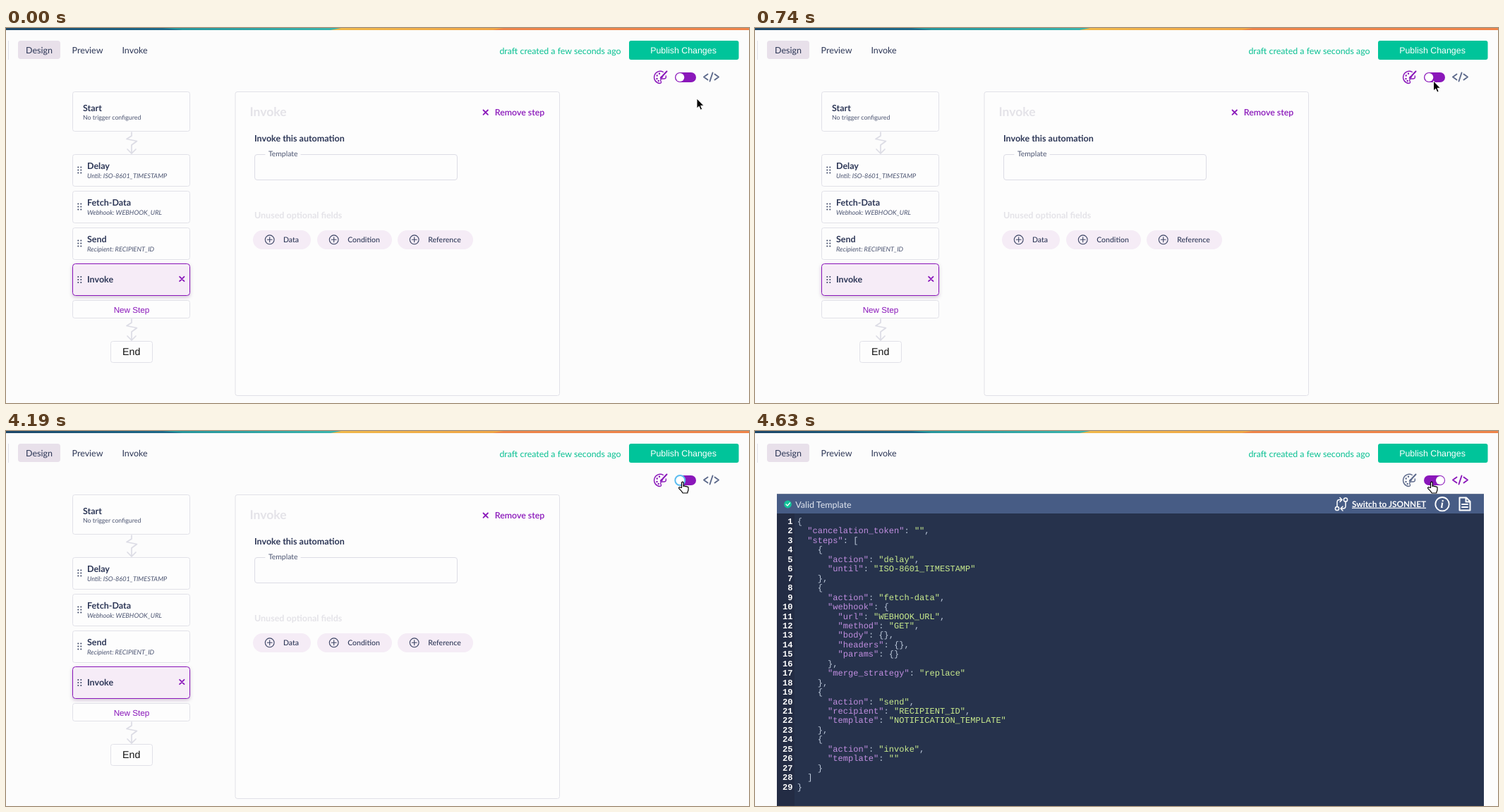
An HTML page for the animation above (8 s loop, 1053 px wide and 532 px high).

```html
<!DOCTYPE html>
<html lang="en">
<head>
<meta charset="utf-8">
<title>Automation designer</title>
<style>
  html, body { margin: 0; width: 100%; height: 100%; overflow: hidden; background: #fcfcfc; }
  svg { display: block; width: 100%; height: 100%; font: 12.5px Lato, sans-serif; fill: #2d3757; text-rendering: geometricPrecision; }
  .bold { font-weight: 700; }
  .small { font-size: 8.8px; fill: #4a5370; }
  .it { font-size: 9.2px; font-style: italic; }
  .mid { text-anchor: middle; }
  .arial { font-family: "Liberation Sans", Arial, sans-serif; }
  .purple { fill: #8a17ba; }
  .faint { fill: #e4e3e8; }
  .line { fill: none; stroke-linecap: round; stroke-linejoin: round; }
  .box { fill: #fdfdfd; stroke: #e1e1e8; }
  .pill { fill: #f5ecf6; }
  .code { font: 12.04px "Liberation Mono", "Courier New", monospace; fill: #bcc8da; }
  .key { fill: #c18ee0; }
  .str { fill: #c9eb8d; }
  .num { fill: #fff; font-weight: 700; text-anchor: end; }
</style>
</head>
<body>
<svg viewBox="0 0 1053 532">
  <defs>
    <filter id="shadow" x="-10%" y="-20%" width="120%" height="150%">
      <feDropShadow dx="0" dy="2" stdDeviation="2.5" flood-color="#50285f" flood-opacity=".25"/>
    </filter>
    <linearGradient id="navy"><stop stop-color="#1c4668"/><stop offset="1" stop-color="#1d6d8d"/></linearGradient>
    <linearGradient id="teal"><stop stop-color="#239099"/><stop offset="1" stop-color="#3bb5ad"/></linearGradient>
    <linearGradient id="gold"><stop stop-color="#f0b94a"/><stop offset="1" stop-color="#f0a445"/></linearGradient>
    <path id="zigzag" class="line" stroke="#dcdce5" stroke-width="1.7"
      d="M178 148v5l-7 4.5 14.5 3-7.5 5.5v12M172 172l6 6 6-6"/>
    <path id="cross" class="line" stroke="#8a17ba" stroke-width="1.8" d="M-3.2-3.2 3.2 3.2M3.2-3.2-3.2 3.2"/>
    <g id="plus" class="line" stroke="#3b4564" stroke-width="1.1">
      <circle r="6.4"/><path d="M-3.4 0h6.8M0-3.4v6.8"/>
    </g>
    <path id="grip" class="line" stroke="#3b4564" stroke-width="2" d="M102.3 197.5v0m0 4v0m0 4v0m4-8v0m0 4v0m0 4v0"/>
  </defs>

  <!-- Header -->
  <rect width="1053" height="532" fill="#fcfcfc"/>
  <path fill="#ee8449" d="M690 0h363v3H690z"/>
  <path fill="url(#gold)" d="M460 0h245l-15 3H460z"/>
  <path fill="url(#teal)" d="M215 0h260l-15 3H215z"/>
  <path fill="url(#navy)" d="M0 0h222l28 3H0z"/>
  <path stroke="#e1e1e8" d="M3.5 18v27"/>
  <rect x="17" y="18" width="60" height="26" rx="4" fill="#e8e0ea"/>
  <g class="mid">
    <text x="47" y="36">Design</text>
    <text x="115.5" y="36">Preview</text>
    <text x="182.5" y="36">Invoke</text>
    <text x="785.5" y="36.5" style="font-size:12.4px;fill:#08c092">draft created a few seconds ago</text>
    <rect x="883" y="18" width="155.5" height="27" rx="3" fill="#00c49a"/>
    <text x="960" y="36" class="arial" style="font-size:12.4px;fill:#fff">Publish Changes</text>
  </g>

  <!-- Visual designer -->
  <g id="visual">
    <rect class="box" x="94.5" y="90.5" width="166" height="56" rx="3"/>
    <text class="bold" x="109" y="118">Start</text>
    <text class="small" x="109" y="130">No trigger configured</text>
    <use href="#zigzag"/>
    <g id="steps"></g>
    <rect x="94.5" y="334.5" width="166" height="45" rx="4" fill="#f6ecf7" stroke="#8a17ba" filter="url(#shadow)"/>
    <use href="#grip" y="155.5"/>
    <text class="bold" x="115" y="361">Invoke</text>
    <use href="#cross" x="249.3" y="356"/>
    <rect class="box" x="94.5" y="386.5" width="166" height="25" rx="3"/>
    <text class="mid arial purple" x="178" y="403.5" font-size="11.7">New Step</text>
    <use href="#zigzag" y="265"/>
    <rect class="box" x="148.5" y="444.5" width="59" height="30" rx="3"/>
    <text class="mid arial" x="177.7" y="464.3" style="font-size:14.2px;fill:#111">End</text>

    <rect class="box" x="325" y="90.5" width="459.5" height="431" rx="3"/>
    <text class="bold faint" x="345.5" y="125" font-size="17.5">Invoke</text>
    <use href="#cross" x="679.7" y="119.7"/>
    <text class="purple mid" x="728" y="124" font-size="12.4" font-weight="600">Remove step</text>
    <text class="bold" x="352" y="160.5">Invoke this automation</text>
    <path class="line" stroke="#dcdce5" d="M367 179.5h-11q-3.5 0-3.5 3.5v29q0 3.5 3.5 3.5h280q3.5 0 3.5-3.5v-29q0-3.5-3.5-3.5H418"/>
    <text class="mid" x="392.7" y="182" font-size="10.4" fill="#4a5370">Template</text>
    <text class="bold faint" x="352" y="270">Unused optional fields</text>
    <g id="pills"></g>
  </g>

  <!-- Code editor -->
  <g id="editor">
    <rect x="31" y="89.5" width="1002" height="443" fill="#26324c"/>
    <rect x="31" y="117" width="25" height="415" fill="#232c44"/>
    <rect x="31" y="89.5" width="1002" height="27.5" fill="#475c85"/>
    <circle cx="46.5" cy="104" r="5.4" fill="#12c59a"/>
    <path class="line" stroke="#fff" stroke-width="1.3" d="m44 104 2 2 3.500-4"/>
    <text class="mid" x="97" y="109.3" style="fill:#e0e5ef">Valid Template</text>
    <text class="mid bold" x="898.5" y="107.7" style="font-size:11.8px;fill:#fff" text-decoration="underline">Switch to JSONNET</text>
    <g class="line" stroke="#fff" stroke-width="1.5">
      <circle cx="825" cy="110" r="2.6"/><circle cx="837" cy="97.5" r="2.6"/>
      <path d="M825 107v-6q0-3.500 3.500-3.500h3m-2.500-3 3 3-3 3M837 100.500v6q0 3.500-3.500 3.500h-3m2.500-3-3 3 3 3"/>
      <circle cx="974" cy="103.7" r="9.7" stroke-width="1.8"/>
      <path stroke-width="2" d="M998.500 94.500h9.500l5.500 5.500v12.500h-15zM1007.500 95v5.500h5.500M1002 104h8m-8 4h8"/>
    </g>
    <text class="mid bold it" x="973.8" y="109" style="font-family:'Liberation Serif',serif;font-size:16px;fill:#fff">i</text>
    <g id="lines" class="code"></g>
  </g>

  <!-- Mode switch -->
  <g id="palette" class="line" stroke="currentColor" stroke-width="1.4">
    <path d="M931.500 62.500a8.600 8.600 0 1 0-5 16c2.500 0 2.300-2 1.500-3.200-1-2 .2-3.300 2-3.300h3c2 0 2.700-1.500 2.300-4"/>
    <path d="M936.500 61.500l-6 6.500" stroke-width="2"/>
    <path d="M930 68q-2.500.3-3 3.500 3.300.3 4-2.500" fill="currentColor" stroke-width=".8"/>
    <path d="M922.500 72v0m.2-4.500v0m3.300-2.800v0m-1.300 10.300v0" stroke-width="2.4"/>
  </g>
  <rect x="948" y="63" width="30" height="14" rx="7" fill="#8a17ba"/>
  <circle id="knob" cy="70" fill="#fff"/>
  <path id="brackets" class="line" stroke="currentColor" stroke-width="1.9" d="m994.500 65.500-5.500 4 5.500 4M1001.500 63.500l-4 12M1004.500 65.500l5.500 4-5.500 4"/>

  <path id="arrow" stroke="#fff" d="M0 0V14L3.200 11.200 5.300 16.200 7.700 15.200 5.600 10.300H10Z" fill="#000"/>
  <path id="hand" transform="translate(952 71)" fill="#fff" stroke="#000" stroke-width="1.2" stroke-linejoin="round"
    d="M5.500 9.500V2.500a1.300 1.300 0 0 1 2.600 0v5c.3-1 2.300-.9 2.500.3 .5-.8 2.100-.6 2.400.5 .6-.6 2-.3 2 1v3.200c0 1.500-1.200 2.300-1.200 4.500H7C6.500 14.500 3 12.500 1.600 10.200 1 9.100 2.500 8.200 3.500 9z"/>
</svg>
<script>
const $ = id => document.getElementById(id);
const show = (id, on) => { $(id).style.display = on ? '' : 'none'; };
const LOOP = 8000, FOCUS = 2690, HOVER = 4190, SWITCH = 4490, SETTLE = 4630;

$('steps').innerHTML = [
  ['Delay', 'Until: ISO-8601_TIMESTAMP'],
  ['Fetch-Data', 'Webhook: WEBHOOK_URL'],
  ['Send', 'Recipient: RECIPIENT_ID']
].map(([name, note], i) => `<g transform="translate(0 ${i * 52})">
  <rect class="box" x="94.5" y="179.5" width="166" height="45" rx="3"/>
  <use href="#grip"/>
  <text class="bold" x="115" y="200.3">${name}</text>
  <text class="small it" x="115" y="212.5">${note}</text></g>`).join('');

$('pills').innerHTML = [
  ['Data', 350, 82, 404], ['Condition', 441, 106, 507], ['Reference', 555, 107, 621.5]
].map(([name, x, width, center]) => `
  <rect class="pill" x="${x}" y="287" width="${width}" height="27" rx="13.5"/>
  <use href="#plus" x="${x + 23.7}" y="300.3"/>
  <text class="mid" x="${center}" y="304" font-size="10.5" font-weight="500">${name}</text>`).join('');

const template = {
  cancelation_token: '',
  steps: [
    { action: 'delay', until: 'ISO-8601_TIMESTAMP' },
    {
      action: 'fetch-data',
      webhook: { url: 'WEBHOOK_URL', method: 'GET', body: {}, headers: {}, params: {} },
      merge_strategy: 'replace'
    },
    { action: 'send', recipient: 'RECIPIENT_ID', template: 'NOTIFICATION_TEMPLATE' },
    { action: 'invoke', template: '' }
  ]
};
$('lines').innerHTML = JSON.stringify(template, null, 2).split('\n').map((line, i) => {
  const y = 132 + i * 13.45, indent = line.search(/\S/);
  const colored = line.trim().replace(/("[^"]*")(:?)/g, (_, text, colon) =>
    `<tspan class="${colon ? 'key' : 'str'}">${text}</tspan>${colon}`);
  return `<text class="num" x="53.5" y="${y}">${i + 1}</text>
    <text x="${59.8 + indent * 7.22}" y="${y}">${colored}</text>`;
}).join('');

// Pointer positions, each held until the next: time, x, y
const moves = [
  [0, 979, 100], [440, 978.5, 99], [590, 971, 88], [740, 961.5, 75],
  [890, 959.5, 73], [1040, 958.5, 72.5], [1190, 957.5, 71]
];

function draw(t) {
  const coding = t >= SWITCH, focused = t >= FOCUS && !coding;
  show('visual', !coding);
  show('editor', coding);
  $('palette').style.color = coding ? '#5d6a8b' : '#8a17ba';
  $('brackets').style.color = coding ? '#8a17ba' : '#5d6a8b';

  const knob = $('knob');
  knob.setAttribute('cx', t >= SETTLE ? 971 : coding ? 967 : 955.3);
  knob.setAttribute('r', focused ? 7 : 6);
  knob.setAttribute('stroke', focused ? '#5bbdf0' : 'none');
  knob.setAttribute('stroke-width', 2);

  const [, x, y] = moves.filter(move => move[0] <= t).pop();
  $('arrow').setAttribute('transform', `translate(${x} ${y})`);
  show('arrow', t < HOVER);
  show('hand', t >= HOVER);
}

const start = performance.now();
function tick() {
  draw((performance.now() - start) % LOOP);
  requestAnimationFrame(tick);
}
tick();
</script>
</body>
</html>
```
